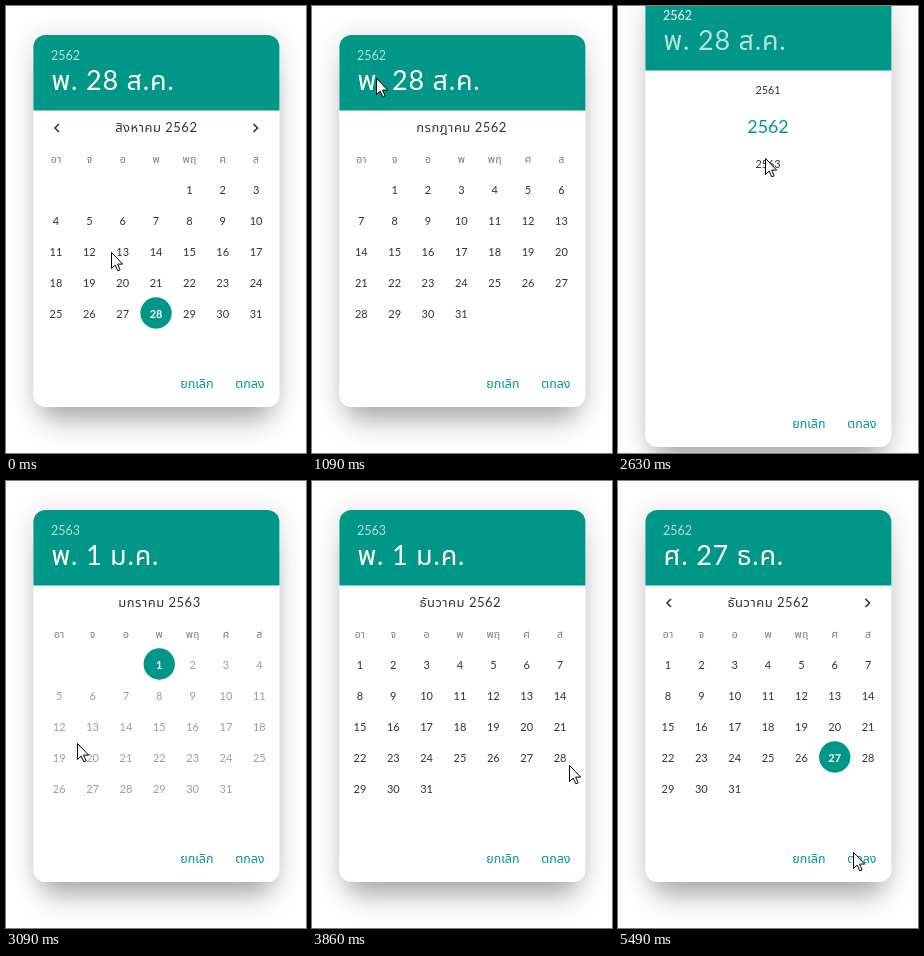
Animation of 300 by 447 pixels, one loop 5.56 s. Source, as an HTML page with a canvas:

```html
<!DOCTYPE html>
<html lang="th">
<head>
<meta charset="utf-8">
<style>
  html, body { margin: 0; width: 300px; height: 447px; overflow: hidden; background: #fefefe; }
  canvas { display: block; }
</style>
</head>
<body>
<canvas id="stage" width="300" height="447"></canvas>
<script>
const ctx = document.getElementById('stage').getContext('2d');
const LOOP = 5560, TEAL = '#009688', INK = 'rgba(0,0,0,.8)';
const FONT = 'Lato, "Noto Sans Thai Looped", "Noto Sans Thai", "Noto Sans", sans-serif';
const LEFT = 27.4, WIDTH = 246;

// Moments at which the state of the picker changes
const DRAG1 = 150, DROP1 = 420, ARROWS1 = 1390, TAP = 1550, YEARS = 1700, DAYS = 2780,
      DRAG2 = 3060, DROP2 = 3480, ARROWS2 = 4330, PICK = 4850;

const WEEKDAYS = ['อา', 'จ', 'อ', 'พ', 'พฤ', 'ศ', 'ส'];
const JUL = { title: 'กรกฎาคม 2562', first: 1 };
const AUG = { title: 'สิงหาคม 2562', first: 4, picked: 28 };
const DEC = { title: 'ธันวาคม 2562', first: 0 };
const JAN = { title: 'มกราคม 2563', first: 3, picked: 1, last: 1 };

// Pointer path: time, x, y
const PATH = [
  [0, 105, 246], [DRAG1, 105, 246], [DROP1, 225, 250], [560, 233, 245],
  [1090, 64, 72], [1320, 62, 46], [1390, 62, 44], [1960, 62, 44],
  [2630, 147, 152], [DAYS, 147, 154], [DRAG2, 68, 262], [DROP2, 275, 275],
  [3620, 274, 277], [4100, 240, 291], [4400, 228, 319], [4560, 228, 276],
  [4780, 216, 276], [5100, 216, 276], [5480, 235, 371], [LOOP, 235, 371]
];

function pointer(t) {
  const i = PATH.findIndex(p => p[0] > t);
  const a = PATH[i - 1], b = PATH[i];
  const k = (t - a[0]) / (b[0] - a[0]), s = k * k * (3 - 2 * k);
  return [a[1] + (b[1] - a[1]) * s, a[2] + (b[2] - a[2]) * s];
}

function text(str, x, y, size, color, { align = 'center', weight = 400, spacing = 0 } = {}) {
  ctx.font = `${weight} ${size}px ${FONT}`;
  ctx.letterSpacing = spacing + 'px';
  ctx.textAlign = align;
  ctx.fillStyle = color;
  ctx.fillText(str, x, y);
}

function disc(x, y, r, color) {
  ctx.fillStyle = color;
  ctx.beginPath();
  ctx.arc(x, y, r, 0, 7);
  ctx.fill();
}

function box(x, y, w, h, radii, color) {
  ctx.fillStyle = color;
  ctx.beginPath();
  ctx.roundRect(x, y, w, h, radii);
  ctx.fill();
}

function shadow(y, h, inset, drop, blur, alpha) {
  ctx.save();
  ctx.shadowColor = `rgba(0,0,0,${alpha})`;
  ctx.shadowBlur = blur;
  ctx.shadowOffsetY = drop;
  box(LEFT + inset, y + inset, WIDTH - 2 * inset, h - 2 * inset, 12, '#fff');
  ctx.restore();
}

// grow: how far the card extends beyond its usual top and bottom
function card(grow) {
  const y = 29 - grow, h = 372 + 2 * grow;
  shadow(y, h, 0, 2, 24, .14);
  shadow(y, h, 9, 24, 26, .26);
  box(LEFT, y, WIDTH, h, 12, '#fefefe');
  box(LEFT, y, WIDTH, 75.4, [12, 12, 0, 0], TEAL);
  const style = { align: 'right', weight: 500 };
  text('ยกเลิก', 207.5, 382 + grow, 12.5, TEAL, style);
  text('ตกลง', 258.5, 382 + grow, 12.5, TEAL, style);
}

function header(t, yearMode, grow) {
  const soft = 'rgba(255,255,255,.7)';
  const later = t >= DAYS && t < PICK;
  const date = t < DAYS ? 'พ. 28 ส.ค.' : later ? 'พ. 1 ม.ค.' : 'ศ. 27 ธ.ค.';
  text(later ? '2563' : '2562', 45, 54 - grow, 12.5, yearMode ? '#fff' : soft, { align: 'left' });
  text(date, 45.5, 84 - grow, 27, yearMode ? soft : '#fff', { align: 'left', spacing: .8 });
}

function month(m, dx, picked = m.picked) {
  if (Math.abs(dx) >= WIDTH) return;
  const colX = c => 50 + c * 33.35 + dx;
  text(m.title, 150.3 + dx, 125.5, 13, INK, { spacing: .5 });
  WEEKDAYS.forEach((name, c) => text(name, colX(c), 156.5, 10.5, 'rgba(0,0,0,.5)'));
  for (let d = 1; d <= 31; d++) {
    const cell = d - 1 + m.first, x = colX(cell % 7), y = 183.5 + 31 * Math.floor(cell / 7);
    const chosen = d === picked;
    if (chosen) disc(x, y - .5, 15.7, TEAL);
    const color = chosen ? '#fff' : d > (m.last || 31) ? 'rgba(0,0,0,.38)' : INK;
    text(d, x, y + 4, 11, color, { weight: chosen ? 700 : 400 });
  }
}

function chevron(x, dir, color) {
  ctx.strokeStyle = color;
  ctx.lineWidth = 1.6;
  ctx.beginPath();
  ctx.moveTo(x - 2 * dir, 118);
  ctx.lineTo(x + 2 * dir, 122);
  ctx.lineTo(x - 2 * dir, 126);
  ctx.stroke();
}

// Offset of the incoming page: follows the pointer, then settles
function slide(t, start, drop) {
  if (t < start) return -WIDTH;
  const dx = pointer(Math.min(t, drop))[0] - pointer(start)[0] - WIDTH;
  return t < drop ? dx : dx * Math.exp((drop - t) / 130);
}

function calendar(t) {
  const early = t < YEARS;
  const dx = early ? slide(t, DRAG1, DROP1) : slide(t, DRAG2, DROP2);
  month(early ? JUL : DEC, dx, t >= PICK ? 27 : undefined);
  month(early ? AUG : JAN, dx + WIDTH);
  const moving = early ? t >= DRAG1 && t < ARROWS1 : t >= DRAG2 && t < ARROWS2;
  if (moving) return;
  chevron(51, -1, INK);
  chevron(249.5, 1, !early && t < DRAG2 ? 'rgba(0,0,0,.26)' : INK);
}

function yearList(t) {
  const y = 88 - 37 * Math.exp((YEARS - t) / 138);
  text('2561', 150, y, 10.8, INK);
  text('2562', 150, y + 39, 17.8, TEAL);
  text('2563', 150, y + 74, 10.8, INK);
}

function arrow(x, y) {
  const shape = [[0, 0], [0, 16], [3.7, 12.6], [6.3, 18.3], [8.6, 17.3], [6.1, 11.6], [11.2, 11.6]];
  ctx.beginPath();
  shape.forEach(([px, py]) => ctx.lineTo(x + px + .5, y + py + .5));
  ctx.closePath();
  ctx.fillStyle = '#fff';
  ctx.fill();
  ctx.strokeStyle = '#000';
  ctx.lineWidth = 1;
  ctx.stroke();
}

function draw(t) {
  const yearMode = t >= YEARS && t < DAYS, grow = yearMode ? 40 : 0;
  ctx.fillStyle = '#fefefe';
  ctx.fillRect(0, 0, 300, 447);
  card(grow);
  header(t, yearMode, grow);
  if (t >= TAP && t < YEARS) disc(62, 44, 12, 'rgba(255,255,255,.2)');

  ctx.save();
  ctx.beginPath();
  ctx.rect(LEFT, 104.4 - grow, WIDTH, 250);
  ctx.clip();
  (yearMode ? yearList : calendar)(t);
  ctx.restore();

  arrow(...pointer(t).map(Math.round));
}

const start = performance.now();
function tick() {
  draw((performance.now() - start) % LOOP);
  requestAnimationFrame(tick);
}
tick();
</script>
</body>
</html>
```
